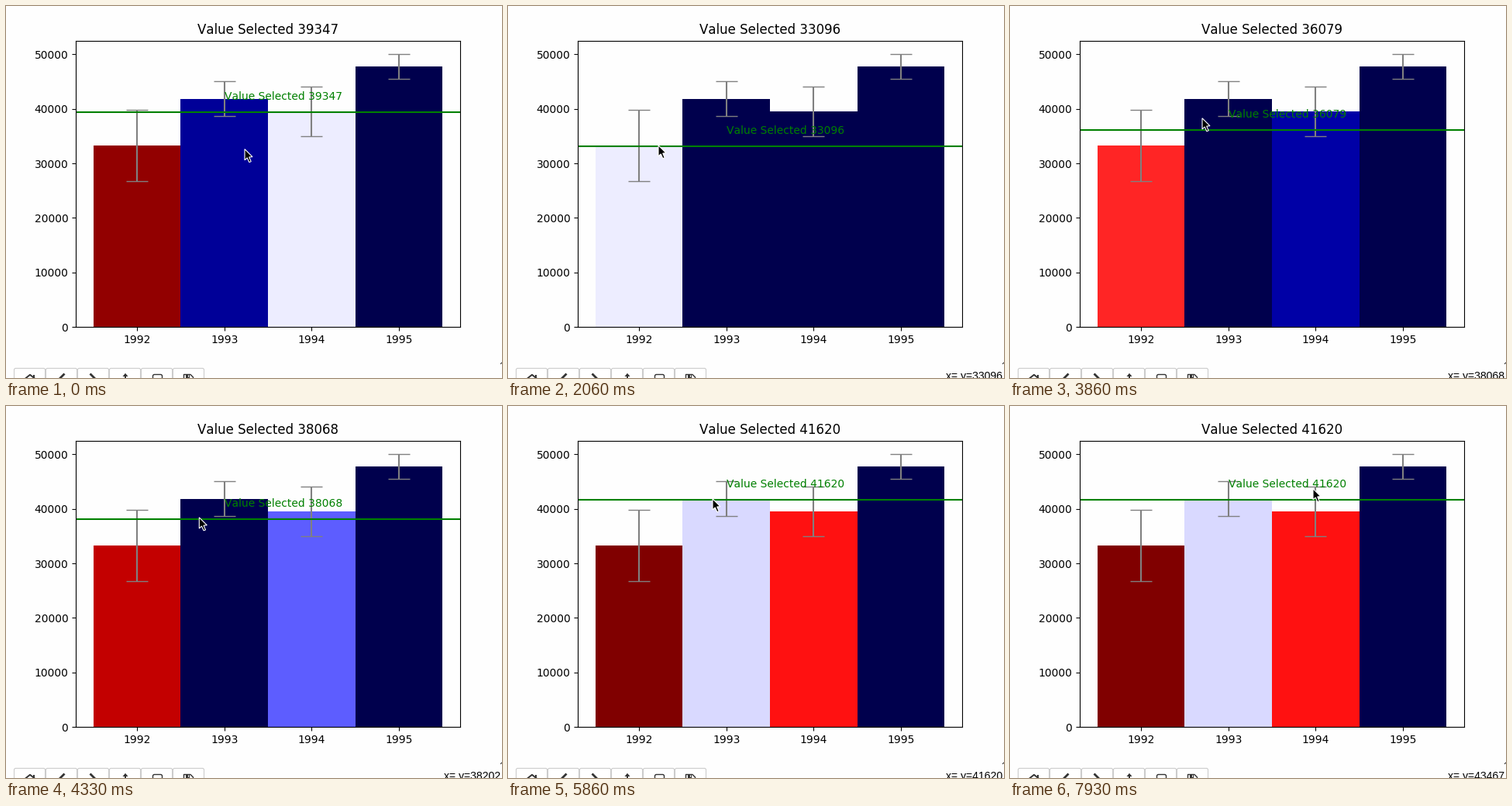
Write a matplotlib script that moves like this. It is 640 px wide and 480 px high and loops after 8000 ms.

```python
import numpy as np
import matplotlib.pyplot as plt
from matplotlib.animation import FuncAnimation
from matplotlib.patches import FancyBboxPatch, Polygon, Rectangle

plt.rcParams["text.kerning_factor"] = 6  # whole-pixel letter spacing

W, H, DPI = 640, 480, 100
STEP, LOOP = 50, 8000
LEFT, BASE, AX_W, AX_H = 90, 414.2, 496, 369.6
PAPER, INK, BORDER = "#fefefe", "#333333", "#cccccc"

# Sample data: four years of noisy readings with 95% confidence intervals
np.random.seed(12345)
YEARS = range(1992, 1996)
CENTERS = [32000, 43000, 43500, 48000]
SPREADS = [200000, 100000, 140000, 70000]
samples = np.array([np.random.normal(c, s, 3650) for c, s in zip(CENTERS, SPREADS)])
means = samples.mean(axis=1)
errs = 1.96 * samples.std(axis=1, ddof=1) / np.sqrt(samples.shape[1])
TOP = 1.05 * (means + errs).max()

# Pointer rests: arrival ms, departure ms, x in pixels, y in data units,
# and the sideways swing in pixels on the way to the next rest
RESTS = [
    (0, 60, 308, 32400, 230),
    (2000, 2130, 194, 33096.7, 0),
    (2900, 3260, 240, 36079.97, 0),
    (3850, 4200, 248, 38068.3, 0),
    (5000, 5050, 278, 41194.2, 0),
    (5550, 5930, 264, 41620.4, 200),
    (7900, LOOP, 391, 43467.3, 0),
]
CLICKS = [2000, 3260, 4200, 5600]
FIRST_VALUE = 39347


def pointer(t):
    """Pointer position at time t: eased travel between rests."""
    i = max(k for k, rest in enumerate(RESTS) if rest[0] <= t)
    _, leave, x, y, swing = RESTS[i]
    if t <= leave:
        return x, y
    arrive, _, x2, y2, _ = RESTS[i + 1]
    u = (t - leave) / (arrive - leave)
    e = u * u * (3 - 2 * u)
    return x + e * (x2 - x) - swing * np.sin(2 * np.pi * u), y + e * (y2 - y)


def selected(t):
    done = [c for c in CLICKS if c <= t]
    return int(pointer(done[-1])[1]) if done else FIRST_VALUE


def status(t):
    """Coordinate readout, empty until the pointer moves inside the axes."""
    x, y = pointer(t)
    return f"x= y={y:g}" if t > 0 and LEFT <= x <= LEFT + AX_W else ""


fig = plt.figure(figsize=(W / DPI, H / DPI), dpi=DPI, facecolor=PAPER)
ax = fig.add_axes([LEFT / W, 1 - BASE / H, AX_W / W, AX_H / H], facecolor=PAPER)
bars = ax.bar(range(4), means, width=1, yerr=errs, capsize=10, ecolor="gray")
ax.set_xticks(range(4), YEARS)
ax.set_xlim(-0.7, 3.7)
ax.set_ylim(0, TOP)
line = ax.axhline(FIRST_VALUE, color="green")
label = ax.text(1, 0, "", color="green")
title = ax.set_title("")

# Pixel-space layer for the toolbar and the pointer
top = fig.add_axes([0, 0, 1, 1], zorder=5)
top.set_xlim(0, W)
top.set_ylim(H, 0)
top.axis("off")


def stroke(xs, ys, width):
    top.plot(xs, ys, color=INK, lw=width, solid_capstyle="butt")


def block(x, y, w, h, color=INK):
    top.add_patch(Rectangle((x, y), w, h, fc=color, lw=0))


def rounded(x, y, w, h, fill, edge, lw):
    top.add_patch(FancyBboxPatch((x + 2, y + 2), w - 4, h - 4, fc=fill, ec=edge,
                                 lw=lw, boxstyle="round,pad=2,rounding_size=2"))


def toolbar():
    for i in range(6):
        rounded(10.5 + 41 * i, 467.5, 40, 34, "white", BORDER, 0.8)
    # home
    stroke([24.5, 31, 37.5], [481, 475.8, 481], 1.4)
    block(34.5, 475.5, 2, 4)
    # back and forward
    for x, way in ((72, -1), (112, 1)):
        stroke([x - 3.5 * way, x + 3.5 * way], [474.5, 481.5], 2)
    # pan
    top.add_patch(Polygon([(154, 473.8), (150.5, 478), (157.5, 478)], fc=INK, lw=0))
    block(153.2, 477, 1.8, 4)
    # zoom
    rounded(189.5, 475.5, 12, 12, "none", INK, 1)
    # save
    stroke([229.5, 229.5, 238, 241.5, 241.5], [482, 475.5, 475.5, 479, 482], 1)
    block(232, 475.5, 5, 4)
    block(235, 476.3, 1.2, 2.4, "white")
    # window corner
    stroke([638, 640], [462, 460], 0.8)


toolbar()
readout = top.text(649.7, 482, "", ha="right", va="baseline",
                   family="Liberation Sans", size=14 * 72 / DPI)
ARROW = np.array([(0, 0), (0, 14.2), (3.2, 11.2), (5.8, 17), (8.2, 16),
                  (5.7, 10.3), (10, 10)])
cursor = top.add_patch(Polygon(ARROW, fc="black", ec="white", lw=0.8, zorder=9))


def update(i):
    t = i * STEP
    value = selected(t)
    share = np.clip((value - means + errs) / (2 * errs), 0, 1)
    for bar, color in zip(bars, plt.get_cmap("seismic")(share)):
        bar.set_facecolor(color)
    line.set_ydata([value, value])
    label.set_position((1, value + 2275))
    for item in (label, title):
        item.set_text(f"Value Selected {value}")
    readout.set_text(status(t))
    x, y = pointer(t)
    cursor.set_xy(ARROW + (x, BASE - y / TOP * AX_H - 1.5))
    return [*bars, line, label, title, readout, cursor]


anim = FuncAnimation(fig, update, frames=LOOP // STEP, interval=STEP,
                     repeat=True, repeat_delay=0)
plt.show()
```
